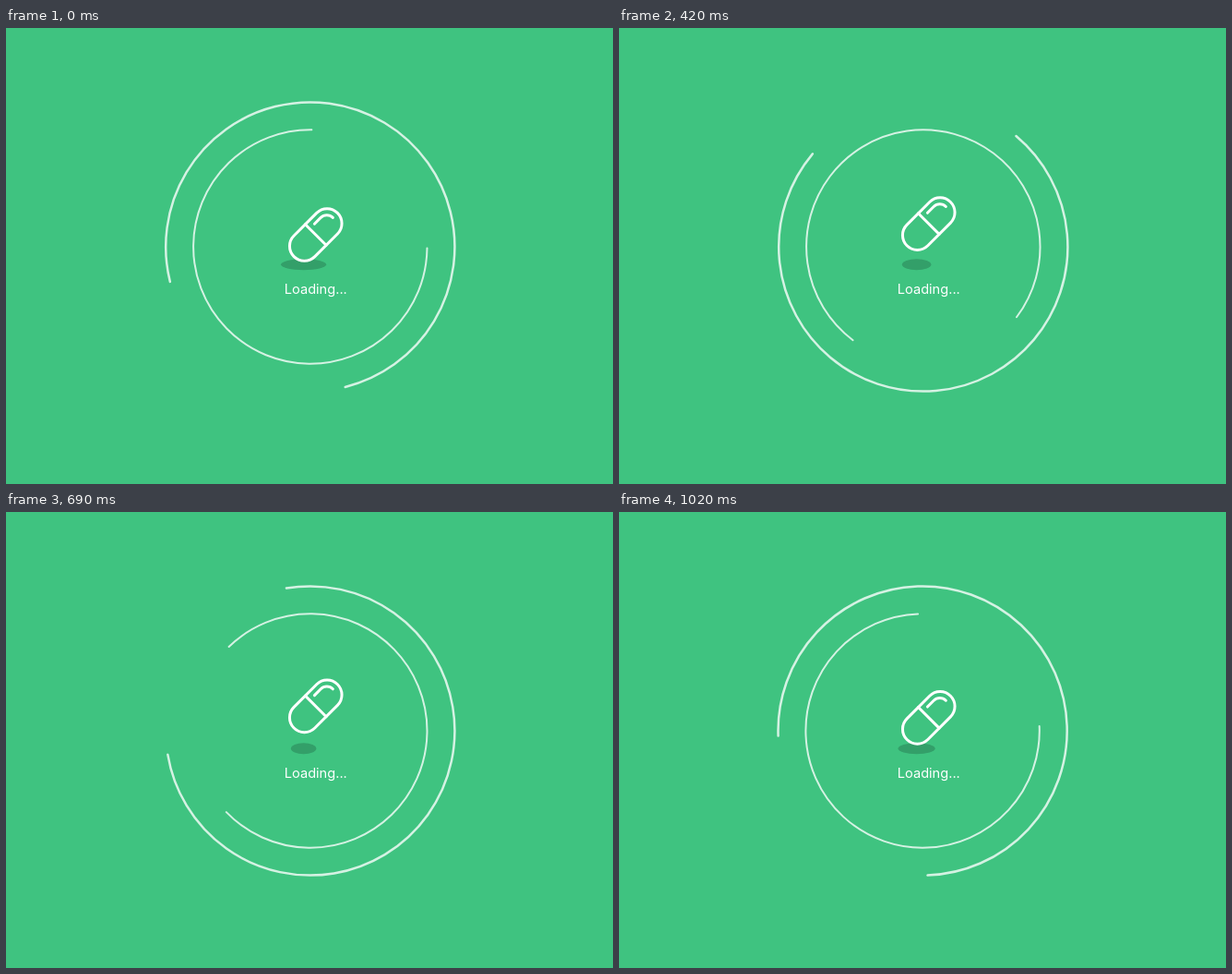
These frames come from a looping animation (658 px wide and 494 px high, 1.05 s). An HTML page:

```html
<!DOCTYPE html>
<html lang="en">
<head>
<meta charset="utf-8">
<title>Loading</title>
<style>
  html, body { margin: 0; width: 100%; height: 100%; overflow: hidden; background: #3fc380; }
  svg { display: block; }
  text { font: 14.6px Inter, "Liberation Sans", sans-serif; fill: #fff; text-anchor: middle; }
  .ring { fill: none; stroke: #fff; stroke-opacity: .78; stroke-linecap: round; stroke-dasharray: 270 90; }
  .pill { fill: none; stroke: #fff; stroke-width: 3; stroke-linecap: round; }
</style>
</head>
<body>
<svg width="658" height="494" viewBox="0 0 658 494">
  <g id="rings">
    <circle id="outer" class="ring" r="156.6" pathLength="360" stroke-width="2.5"/>
    <circle id="inner" class="ring" r="126.7" pathLength="360" stroke-width="2"/>
  </g>
  <ellipse id="shadow" cx="322.6" cy="256.2" ry="6" fill="#339f69"/>
  <g id="pill" class="pill">
    <rect x="-33.4" y="-16" width="66.8" height="32" rx="16"/>
    <path d="M0 -16V16M7.4 -9.3H17A9.3 9.3 0 0 1 26.3 0"/>
  </g>
  <text x="335.8" y="288">Loading...</text>
</svg>
<script>
  const LOOP = 1050, STEP = 30;
  const get = id => document.getElementById(id);
  const [rings, outer, inner, shadow, pill] =
    ["rings", "outer", "inner", "shadow", "pill"].map(get);

  // Each track is a list of [time in ms, value]; ring values are the middle of the gap in degrees.
  const tracks = {
    outer: [[0, 121], [150, 61], [300, -59], [420, -95], [600, -134], [780, -155], [1020, -227], [LOOP, -239]],
    inner: [[0, -44.3], [150, 1], [300, 46], [420, 82], [600, 121], [780, 240.8], [1020, 312.7], [LOOP, 315.7]],
    ringX: [[0, 329.8], [780, 329.8], [1020, 329.1], [LOOP, 329.8]],
    pillY: [[0, 224], [600, 207], [LOOP, 224]],
    shadow: [[0, 24.5], [600, 12], [LOOP, 20.6]]
  };

  function valueAt(track, t) {
    const i = track.findIndex(([end]) => end > t);
    const [t0, a] = track[i - 1], [t1, b] = track[i];
    return a + (b - a) * (t - t0) / (t1 - t0);
  }

  function draw(now) {
    const t = Math.floor((now % LOOP) / STEP) * STEP;
    const at = name => valueAt(tracks[name], t);
    const turn = (ring, gap) => ring.setAttribute("transform", `rotate(${gap + 45})`);
    rings.setAttribute("transform", `translate(${at("ringX")} 237)`);
    turn(outer, at("outer"));
    turn(inner, at("inner"));
    pill.setAttribute("transform", `translate(335.75 ${at("pillY")}) rotate(-45)`);
    shadow.setAttribute("rx", at("shadow"));
  }

  const start = performance.now();
  function tick() {
    draw(performance.now() - start);
    requestAnimationFrame(tick);
  }
  tick();
</script>
</body>
</html>
```
